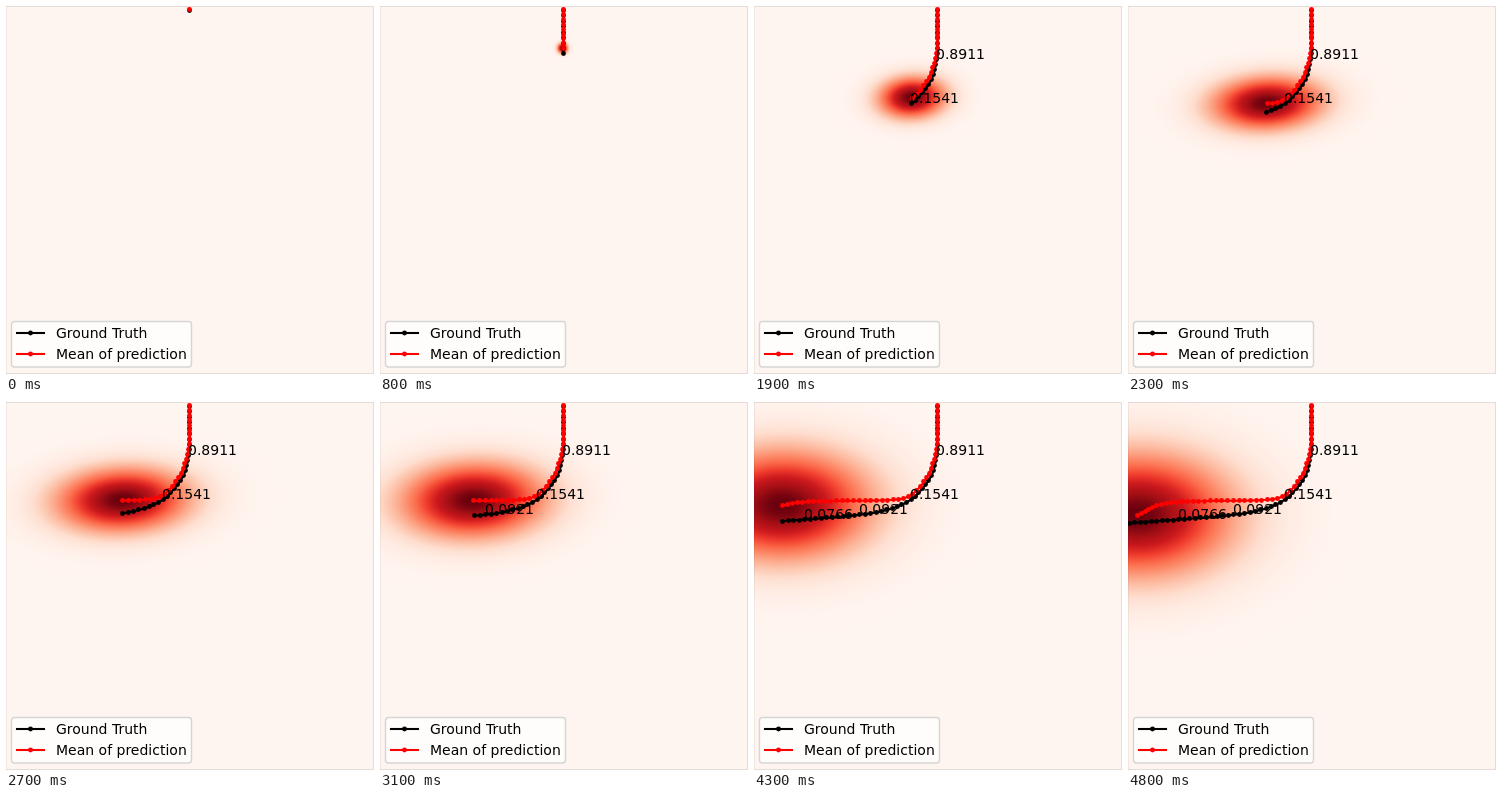
Recreate the animation shown at these times as an HTML page with a canvas. Size 368x368 px, loop 4900 ms.

```html
<!DOCTYPE html>
<html lang="en">
<head>
<meta charset="utf-8">
<title>Trajectory prediction</title>
<style>
  html, body { margin: 0; width: 100%; height: 100%; overflow: hidden; background: #fff5f0; }
  canvas { display: block; }
</style>
</head>
<body>
<canvas id="stage" width="368" height="368"></canvas>
<script>
const SIZE = 368, STEP = 100, STEPS = 49;
const ctx = document.getElementById('stage').getContext('2d');

// Key points: step, x, y
const TRUTH = [[0, 183, 4], [7, 182.9, 42], [12, 179, 68], [15, 171, 82.3],
  [19, 156.5, 97], [23, 137.5, 106], [29, 105.2, 112.3], [48, 0.5, 120.8]];
const MEAN = [[0, 183, 3], [9, 182, 47], [15, 172.3, 75], [19.5, 156, 93],
  [23, 139, 97.2], [41, 37.5, 100.8], [48, 9, 113]];
const SCORES = ['0.8911', '0.1541', '0.0921', '0.0766'];
const REDS = ['fff5f0', 'fee0d2', 'fcbba1', 'fc9272', 'fb6a4a', 'ef3b2c', 'cb181d', 'a50f15', '67000d']
  .map(hex => [0, 2, 4].map(i => parseInt(hex.slice(i, i + 2), 16)));

const smooth = u => {
  u = Math.min(Math.max(u, 0), 1);
  return u * u * (3 - 2 * u);
};

// Smooth curve through unevenly spaced keys
function sample(keys, k) {
  let i = 0;
  while (i < keys.length - 2 && k >= keys[i + 1][0]) i++;
  const a = keys[i], b = keys[i + 1], h = b[0] - a[0], u = (k - a[0]) / h;
  const slope = (n, d) => {
    const p = keys[Math.max(n - 1, 0)], q = keys[Math.min(n + 1, keys.length - 1)];
    return (q[d] - p[d]) / (q[0] - p[0]);
  };
  return [1, 2].map(d => a[d] + (b[d] - a[d]) * smooth(u)
    + h * u * (1 - u) * ((1 - u) * slope(i, d) - u * slope(i + 1, d)));
}

function reds(v) {
  const i = Math.min(Math.floor(v * 8), 7), f = v * 8 - i;
  return `rgb(${REDS[i].map((c, j) => Math.round(c + (REDS[i + 1][j] - c) * f))})`;
}

const REACH = 3.6;
const heat = ctx.createRadialGradient(0, 0, 0, 0, 0, REACH);
for (let i = 0; i <= 48; i++) {
  const r = REACH * i / 48;
  heat.addColorStop(i / 48, i < 48 ? reds(Math.exp(-r * r / 2)) : reds(0));
}

const path = keys => Array.from({ length: STEPS }, (_, k) => sample(keys, k));
const truth = path(TRUTH), mean = path(MEAN);

function drawLine(points, color) {
  ctx.strokeStyle = color;
  ctx.lineWidth = 2.08;
  ctx.lineJoin = 'round';
  ctx.lineCap = 'square';
  ctx.beginPath();
  points.forEach(p => ctx.lineTo(...p));
  ctx.stroke();
}

function drawDot(x, y, color) {
  ctx.fillStyle = color;
  ctx.beginPath();
  ctx.arc(x, y, 2.4, 0, 7);
  ctx.fill();
}

// Markers sit on whole pixels
function drawTrack(points, color) {
  drawLine(points.map(([x, y]) => [x + 0.5, y + 0.5]), color);
  for (const [x, y] of points) drawDot(Math.round(x) + 0.5, Math.round(y) + 0.5, color);
}

function drawText(str, x, y) {
  ctx.font = '14px "DejaVu Sans", sans-serif';
  ctx.fillStyle = '#000';
  ctx.fillText(str, x, y);
}

function drawHeat(k) {
  const sy = Math.max(0.9, 0.94 * k - 4);
  const sx = sy + 23 * smooth((k - 14) / 12);
  ctx.save();
  ctx.translate(...mean[k]);
  ctx.rotate(-0.1 * (1 - k / STEPS));
  ctx.scale(sx, sy);
  ctx.fillStyle = heat;
  ctx.beginPath();
  ctx.arc(0, 0, REACH, 0, 7);
  ctx.fill();
  ctx.restore();
}

function drawLegend() {
  ctx.beginPath();
  ctx.roundRect(5.5, 315.5, 180, 45.5, 3);
  ctx.fillStyle = 'rgba(255,255,255,.8)';
  ctx.fill();
  ctx.strokeStyle = 'rgba(204,204,204,.8)';
  ctx.lineWidth = 1.4;
  ctx.stroke();
  [['Ground Truth', '#000', 327], ['Mean of prediction', '#f00', 348]].forEach(([name, color, y]) => {
    drawLine([[11, y], [38, y]], color);
    drawDot(24.5, y, color);
    drawText(name, 50, y + 5);
  });
}

function draw(k) {
  ctx.fillStyle = reds(0);
  ctx.fillRect(0, 0, SIZE, SIZE);
  drawHeat(k);

  ctx.strokeStyle = 'rgba(0,0,0,.1)';
  ctx.lineWidth = 1;
  ctx.strokeRect(0.5, 0.5, SIZE - 1, SIZE - 1);

  drawTrack(truth.slice(0, k + 1), '#000');
  drawTrack(mean.slice(0, k + 1), '#f00');
  // One score every ten steps
  SCORES.forEach((score, i) => {
    const at = 10 * i + 9, [x, y] = truth[at];
    if (k >= at) drawText(score, Math.round(x - 0.5), Math.round(y));
  });
  drawLegend();
}

function tick() {
  draw(Math.floor(performance.now() / STEP) % STEPS);
  requestAnimationFrame(tick);
}
tick();
</script>
</body>
</html>
```
